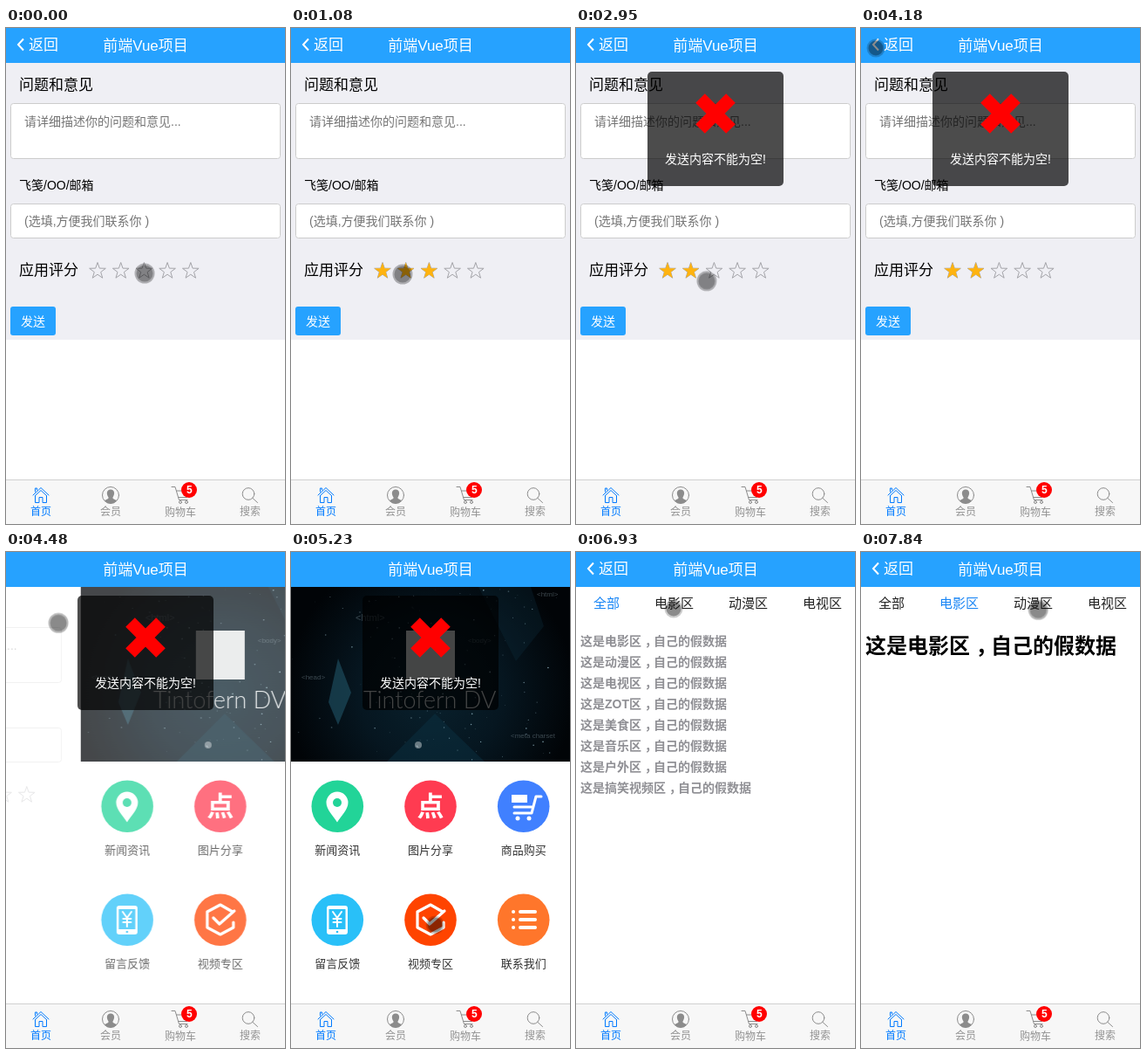
Animation of 320x568 px, one loop 7990 ms. Source, as an HTML page:

```html
<!DOCTYPE html>
<html lang="zh-CN">
<head>
<meta charset="utf-8">
<title>前端Vue项目</title>
<style>
html, body { margin: 0; width: 100%; height: 100%; overflow: hidden; background: #fff; }
svg { display: block; width: 320px; height: 568px; font-family: "Liberation Sans", "Noto Sans CJK SC", "Noto Sans CJK", sans-serif; }
text { white-space: pre; }
.mid { text-anchor: middle; }
.line { fill: none; stroke: #fff; stroke-linecap: round; stroke-linejoin: round; }
.box { fill: #fff; stroke: #ccc; }
.hint { font-size: 14px; fill: #757575; }
.big { font-size: 17px; }
.medium { font-weight: 500; }
.code { font: 8px "Liberation Sans", sans-serif; fill: #8fa3ad; opacity: .4; }
.tab { font-size: 12px; text-anchor: middle; fill: #929292; }
.ico { fill: none; stroke: #8c8c8c; stroke-width: 1; stroke-linejoin: round; stroke-linecap: round; }
</style>
</head>
<body>
<svg viewBox="0 0 320 568">
  <defs>
    <radialGradient id="night" gradientUnits="userSpaceOnUse" cx="160" cy="160" r="165">
      <stop offset="0" stop-color="#09212d"/>
      <stop offset=".5" stop-color="#061620"/>
      <stop offset="1" stop-color="#010407"/>
    </radialGradient>
  </defs>
  <rect width="320" height="568" fill="#fff"/>

  <g id="form">
    <rect id="formBg" y="40" width="320" height="317" fill="#efeff4"/>
    <text class="big" x="15" y="71">问题和意见</text>
    <rect class="box" x="5.5" y="86.5" width="309" height="63" rx="3"/>
    <text class="hint" x="21" y="112">请详细描述你的问题和意见...</text>
    <text x="15" y="185" font-size="14">飞笺/OO/邮箱</text>
    <rect class="box" x="5.5" y="201.5" width="309" height="39" rx="3"/>
    <text class="hint" x="21" y="226">(选填,方便我们联系你 )</text>
    <text class="big" x="15" y="282.500">应用评分</text>
    <g id="stars"></g>
    <rect x="5" y="319" width="52" height="33" rx="3" fill="#26a2ff"/>
    <text x="17" y="340.500" font-size="14" fill="#fff">发送</text>
  </g>

  <g id="home">
    <rect y="40" width="320" height="200" fill="url(#night)"/>
    <path d="M54 122L69 161 54 198 43 172z" fill="#1d4a5c" opacity=".7"/>
    <path d="M110 240L165 185 222 240z" fill="#0d3445" opacity=".45"/>
    <path d="M215 40L258 125 290 85 275 40z" fill="#0f3140" opacity=".3"/>
    <g id="sky"></g>
    <text class="code" x="74" y="79" style="font-size:11px">&lt;html&gt;</text>
    <text class="code" x="203" y="104">&lt;body&gt;</text>
    <text class="code" x="12" y="146">&lt;head&gt;</text>
    <text class="code" x="252" y="213">&lt;meta charset</text>
    <text class="code" x="282" y="51">&lt;html&gt;</text>
    <rect x="132" y="90" width="56" height="56" fill="#e4e6e6"/>
    <text x="83" y="179" font-size="27" fill="#dfe3e4" style="font-family:Lato,sans-serif;font-weight:300">Tintofern DV</text>
    <circle cx="146" cy="221" r="4" fill="#fff" opacity=".4"/>
    <g id="tiles"></g>
    <path d="M53 309.500C48.500 302 40.500 295 40.500 287A12.500 12.500 0 0 1 65.500 287C65.500 295 57.500 302 53 309.500z" fill="#fff"/>
    <circle cx="53" cy="287" r="5" fill="#22d498"/>
    <text class="mid" x="160" y="302" font-size="31" font-weight="bold" fill="#fff">点</text>
    <rect x="253" y="278" width="18" height="9" fill="#fff"/>
    <path class="line" stroke-width="3" d="M287 280H281L276 299H256M256 292H276"/>
    <circle cx="260" cy="305" r="2.500" fill="#fff"/><circle cx="273" cy="305" r="2.500" fill="#fff"/>
    <rect x="41" y="405" width="24" height="33" rx="3" fill="#fff"/>
    <rect x="43.500" y="409" width="19" height="23" fill="#29c0f8"/>
    <path class="line" stroke-width="2" d="M48 412L53 419 58 412M53 419V429M48.500 420H57.500M48.500 424H57.500"/>
    <circle cx="53" cy="435" r="1.300" fill="#29c0f8"/>
    <path class="line" stroke-width="3.200" d="M174 412L160 404 145 412V430L160 438 175 430V424M152 419L159 426 176 411"/>
    <path class="line" stroke-width="4" d="M255 412h.1M255 421h.1M255 430h.1M263 412H280M263 421H280M263 430H280"/>
  </g>

  <g id="video">
    <g id="topics" font-size="15"></g>
    <g id="list" font-size="14" font-weight="bold" fill="#8f8f94"></g>
    <g id="film"></g>
  </g>

  <rect width="320" height="40" fill="#26a2ff"/>
  <text class="mid big medium" x="160" y="26" fill="#fff">前端Vue项目</text>
  <g id="back">
    <path d="M20 12.500L14 19 20 25.500" fill="none" stroke="#fff" stroke-width="2"/>
    <text class="big medium" x="26" y="25" fill="#fff">返回</text>
  </g>

  <rect y="517" width="320" height="51" fill="#f7f7f7"/>
  <rect y="517" width="320" height="1" fill="#d0d0d0"/>
  <path class="ico" style="stroke:#007aff" d="M31 535L40 526.500 49 535M33.500 535.500V543.500H38V537.500H42V543.500H46.500V535.500M33.500 531V527H35.500V529M33.500 535.500L40 529.500 46.500 535.500"/>
  <circle class="ico" cx="120" cy="535" r="9.500"/>
  <path d="M113 541.500C114 539.500 118 540 117.500 537.500C115 534 115 528.500 120 528.500S125 534 122.500 537.500C122 540 126 539.500 127 541.500A9.500 9.500 0 0 1 113 541.500z" fill="#8c8c8c"/>
  <path class="ico" d="M190 525.500H194L198.500 540.500H208M195.500 530H210L207.500 537.500H197.500"/>
  <circle class="ico" cx="200" cy="543" r="1.500"/><circle class="ico" cx="207" cy="543" r="1.500"/>
  <circle class="ico" cx="278" cy="533.500" r="6.800"/>
  <path class="ico" d="M283 538.500L288.500 543.500"/>
  <circle cx="210" cy="529" r="9" fill="#f00"/>
  <text class="mid" x="210.300" y="533.300" font-size="12" font-weight="bold" fill="#fff">5</text>
  <text class="tab" x="40" y="557.500" style="fill:#007aff">首页</text>
  <text class="tab" x="120" y="557.500">会员</text>
  <text class="tab" x="200" y="558.500">购物车</text>
  <text class="tab" x="280" y="557.500">搜索</text>

  <g id="toast">
    <rect x="82" y="50" width="156" height="131" rx="5" fill="#000" opacity=".7"/>
    <path d="M142.500 80.500L177.500 115.500M177.500 80.500L142.500 115.500" stroke="#f00" stroke-width="15"/>
    <text class="mid medium" x="160" y="154.500" font-size="14" fill="#fff">发送内容不能为空!</text>
  </g>

  <g id="cursor">
    <g id="loose"><circle r="11.500" opacity=".28"/><circle r="9.500" opacity=".25"/></g>
    <g id="pressed"><circle r="10.500" opacity=".2"/><circle r="8.500" opacity=".32"/></g>
  </g>
</svg>
<script>
const LOOP = 7990, STEP = 150;
const $ = id => document.getElementById(id);
const anims = [];

// Stretches of time in which the screen is redrawn; it holds still between them.
const RUNS = [[120, 1080], [1700, 1850], [2130, 2250], [2650, 3620],
  [4180, 5080], [5230, 6220], [6930, 7230], [7540, 7840]];

// keys: [ms, properties, easing]
function play(el, keys) {
  const first = keys[0], last = keys[keys.length - 1];
  const all = [[0, first[1], 'step-end'], ...keys, [LOOP, last[1]]];
  const anim = el.animate(all.map(([t, props, easing = 'linear']) =>
    ({ ...props, easing, offset: t / LOOP })), LOOP);
  anim.pause();
  anims.push(anim);
}
const hold = (el, prop, keys) =>
  play(el, keys.map(([t, v]) => [t, { [prop]: v }, 'step-end']));
const at = (x, opacity) => ({ transform: `translate(${x}px, 0px)`, opacity });

// Rating stars
const starPath = cx => 'M' + Array.from({ length: 10 }, (_, i) => {
  const r = i % 2 ? 3.9 : 9.8, a = i * Math.PI / 5;
  return `${(cx + r * Math.sin(a)).toFixed(2)} ${(278.3 - r * Math.cos(a)).toFixed(2)}`;
}).join('L') + 'z';
for (let i = 0; i < 5; i++) {
  const d = starPath(105 + i * 26.7);
  $('stars').innerHTML += `<path d="${d}" fill="none" stroke="#a3a3a8"/><path class="lit" d="${d}" fill="#ffb310"/>`;
}
document.querySelectorAll('.lit').forEach((el, i) =>
  hold(el, 'opacity', [[0, 0], [270, i < 3 ? 1 : 0], [1850, i < 2 ? 1 : 0]]));

// Specks in the banner, denser towards the middle
let seed = 7;
const rand = () => (seed = seed * 16807 % 2147483647) / 2147483647;
for (let i = 0; i < 130; i++) {
  const x = (rand() + rand()) * 160, y = 41 + rand() * 198, r = .3 + rand() * .6;
  $('sky').innerHTML += `<circle cx="${x}" cy="${y}" r="${r}" fill="#9fc4d2" opacity="${.2 + rand() * .6}"/>`;
}

[['新闻资讯', '#22d498'], ['图片分享', '#ff3b51'], ['商品购买', '#4080ff'],
 ['留言反馈', '#29c0f8'], ['视频专区', '#ff4400'], ['联系我们', '#ff762b']].forEach(([name, color], i) => {
  const x = 53.3 + i % 3 * 106.7, y = 291.3 + (i > 2 ? 130 : 0);
  $('tiles').innerHTML += `<circle cx="${x}" cy="${y}" r="29.8" fill="${color}"/>
    <text class="mid" x="${x}" y="${y + 54.2}" font-size="13" fill="#333">${name}</text>`;
});

['全部', '电影区', '动漫区', '电视区'].forEach((name, i) => {
  $('topics').innerHTML += `<text x="${i ? 5 + i * 85 : 20}" y="64" fill="#222">${name}</text>`;
});
// The wide comma sits in the middle of its cell.
const note = (name, y) => `<text x="5" y="${y}">这是${name}区<tspan dx=".27em">，</tspan><tspan dx="-.27em">自己的假数据</tspan></text>`;
['电影', '动漫', '电视', 'ZOT', '美食', '音乐', '户外', '搞笑视频'].forEach((name, i) => {
  $('list').innerHTML += note(name, 107 + i * 24);
});
$('film').innerHTML = `<g font-size="24" font-weight="bold">${note('电影', 116)}</g>`;

// Page changes
const BACK = 4262, OPEN = 5530, SLIDE = 500, PICK = 7080;
play($('form'), [[BACK, at(0, 1), 'ease'], [BACK + SLIDE, at(-257, 0)]]);
play($('home'), [[BACK, at(320, 0), 'ease'], [BACK + SLIDE, at(0, 1)],
  [OPEN, at(0, 1), 'ease'], [OPEN + SLIDE, at(-320, 0)]]);
play($('video'), [[OPEN, at(320, 0), 'ease'], [OPEN + SLIDE, at(0, 1)]]);
// The leaving form loses its backdrop and shrinks to fit its content.
hold($('formBg'), 'opacity', [[0, 1], [BACK, 0]]);
document.querySelectorAll('.box').forEach(el =>
  hold(el, 'width', [[0, '309px'], [BACK, '246px']]));
hold($('back'), 'opacity', [[0, 1], [BACK, 0], [OPEN, 1]]);
hold($('list'), 'opacity', [[0, 1], [PICK, 0]]);
hold($('film'), 'opacity', [[0, 0], [PICK, 1]]);
const [allTab, filmTab] = $('topics').children;
hold(allTab, 'fill', [[0, '#1a86f5'], [PICK, '#222']]);
hold(filmTab, 'fill', [[0, '#222'], [PICK, '#1a86f5']]);
play($('toast'), [[2650, { opacity: 0 }], [2940, { opacity: 1 }],
  [5400, { opacity: 1 }], [5680, { opacity: 0 }]]);

// Pointer path: ms, x, y
play($('cursor'), [
  [0, 159, 281], [120, 161, 282], [420, 199, 288], [570, 196, 287], [1080, 128, 282], [2129, 128, 282],
  [2130, 55, 334], [2250, 44, 340], [2650, 44, 340], [2950, 150, 290],
  [3250, 100, 150], [3620, 18, 28], [4180, 17, 23], [4330, 20, 28], [4480, 60, 81],
  [4780, 125, 260], [5080, 165, 427], [5830, 166, 427.5], [6220, 112, 65],
  [7380, 112, 65], [7840, 203.3, 66.3]
].map(([t, x, y]) => [t, { transform: `translate(${x}px, ${y}px)` }]));
hold($('cursor'), 'opacity', [[0, 1], [1850, 0], [2130, 1]]);
const taps = [[120, 270], [1700, 1850], [2250, 2650], [4180, 4330], [5230, 5380], [6930, 7080]];
hold($('pressed'), 'opacity', [[0, 0], ...taps.flatMap(([a, b]) => [[a, 1], [b, 0]])]);
hold($('loose'), 'opacity', [[0, 1], ...taps.flatMap(([a, b]) => [[a, 0], [b, 1]])]);

function snap(t) {
  let out = 0;
  for (const [a, b] of RUNS) {
    if (t >= a) out = t >= b ? b : a + Math.floor((t - a) / STEP) * STEP;
  }
  return out;
}
const start = performance.now();
function draw() {
  const t = snap((performance.now() - start) % LOOP);
  for (const anim of anims) anim.currentTime = t + .5;
  requestAnimationFrame(draw);
}
draw();
</script>
</body>
</html>
```
